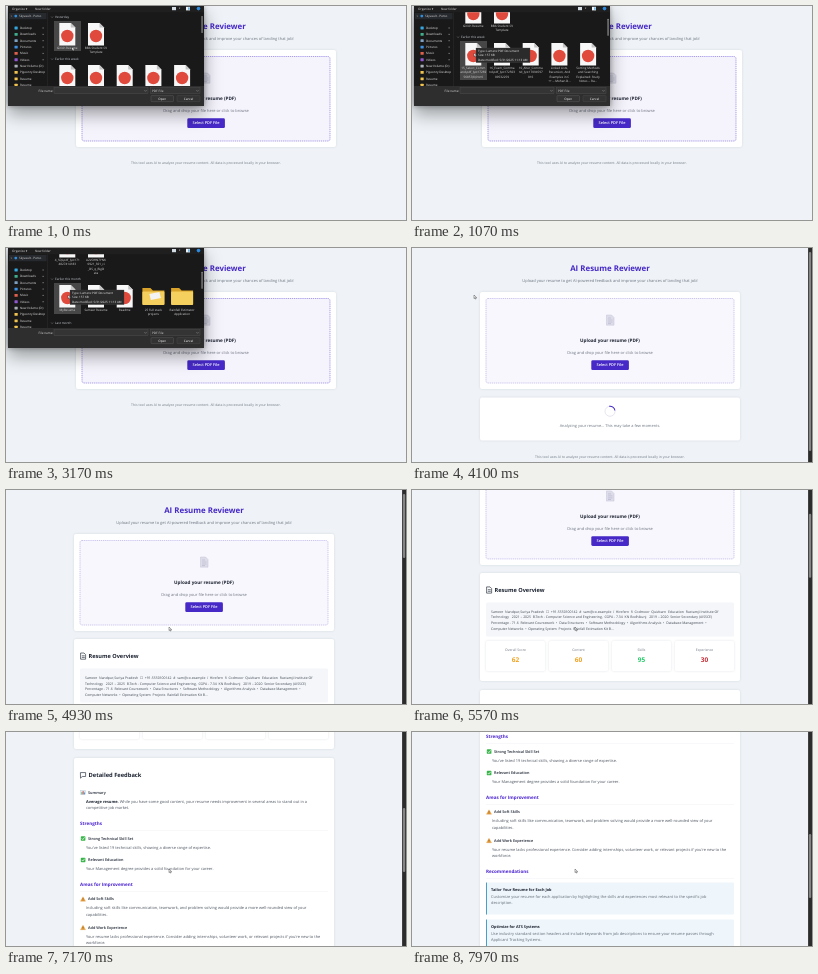
Recreate the animation shown at these times as an HTML page. Size 400x214 px, loop 8 s.

```html
<!DOCTYPE html>
<html lang="en">
<head>
<meta charset="utf-8">
<title>AI Resume Reviewer</title>
<style>
  html, body { margin: 0; width: 100%; height: 100%; overflow: hidden; background: #eff3f7; }
  svg { display: block; width: 100vw; height: 100vh; }
  text { font-family: "Open Sans", "Noto Sans", sans-serif; white-space: pre; text-rendering: geometricPrecision; }
  .card { fill: #fff; filter: drop-shadow(0 .8px 1.2px rgba(30, 40, 70, .13)); }
  .line { fill: none; stroke: #1f2937; stroke-width: .65; stroke-linejoin: round; stroke-linecap: round; }
  #dialog { filter: drop-shadow(0 .5px 2.7px rgba(0, 0, 0, .33)) drop-shadow(0 8.3px 8.3px rgba(0, 0, 0, .36)); }
</style>
</head>
<body>
<svg id="stage" viewBox="0 0 400 214" preserveAspectRatio="none"></svg>
<script>
const LOOP = 8000;
const DIALOG_END = 3520, ANALYZE_START = 3620, RESULTS_START = 4650;
const SCROLL_START = 4963, SCROLL_SPEED = 0.1087;
const INDIGO = '#4629c6', INK = '#1b2230', GREY = '#6c7480';

const rect = (x, y, w, h, fill, extra = '') =>
  `<rect x="${x}" y="${y}" width="${w}" height="${h}" fill="${fill}" ${extra}/>`;
const circle = (x, y, r, fill) => `<circle cx="${x}" cy="${y}" r="${r}" fill="${fill}"/>`;
const path = (d, extra) => `<path d="${d}" ${extra}/>`;
const card = (x, y, w, h, r = 2) => `<rect class="card" x="${x}" y="${y}" width="${w}" height="${h}" rx="${r}"/>`;
const group = (id, content, extra = '') => `<g id="${id}" ${extra}>${content}</g>`;

// y is the visual middle of the line
const text = (x, y, size, str, fill = GREY, weight = 400, anchor = 'start') =>
  `<text x="${x}" y="${(y + size * .32).toFixed(2)}" font-size="${size}" fill="${fill}" font-weight="${weight}" text-anchor="${anchor}">${str}</text>`;
const centered = (x, y, size, str, fill, weight) => text(x, y, size, str, fill, weight, 'middle');
const lines = (x, y, step, size, list, fill, anchor) =>
  list.map((str, i) => text(x, y + i * step, size, str, fill, 400, anchor)).join('');

// ---------- page ----------
function uploadCard() {
  return centered(198, 20.5, 7.9, 'AI Resume Reviewer', INDIGO, 700)
    + centered(198, 32.5, 3.98, 'Upload your resume to get AI-powered feedback and improve your chances of landing that job!')
    + card(68, 44, 260, 97)
    + `<rect id="drop" x="74" y="50.5" width="248" height="84.5" rx="2" stroke-width=".6" stroke-dasharray="1.3 .8"/>`
    + path('M194.5 67h5l2.5 2.5v7.7h-7.5z', 'fill="#dddde9" stroke="#b9b9cf" stroke-width=".4"')
    + path('M196 70h3M196 72h4.5M196 74h4.5M196 75.6h3', 'stroke="#a9a9c4" stroke-width=".5"')
    + centered(198, 93, 4.62, 'Upload your resume (PDF)', INK, 700)
    + centered(198, 105, 3.97, 'Drag and drop your file here or click to browse')
    + rect(179.3, 112.3, 37.6, 9.8, INDIGO, 'rx="1.4"')
    + centered(198, 117.2, 3.9, 'Select PDF File', '#fff', 600);
}

function analyzingCard() {
  return card(68, 149.5, 260, 43)
    + '<circle cx="198" cy="163.3" r="5" fill="none" stroke="#e6e6f2" stroke-width="1"/>'
    + `<path id="spinner" d="M194.46 159.76A5 5 0 0 1 201.54 159.76" fill="none" stroke="${INDIGO}" stroke-width="1"/>`
    + centered(198, 177.5, 3.91, 'Analyzing your resume... This may take a few moments.');
}

function overviewCard() {
  const scores = [['Overall Score', 62, '#f0a11e'], ['Content', 60, '#f0a11e'], ['Skills', 95, '#27c96a'], ['Experience', 30, '#c62f38']];
  return card(68, 149, 260, 108)
    + path('M75 163h3l1.6 1.6v4.6h-4.6zM76.2 165.8h2.2M76.2 167.4h2.2', 'class="line"')
    + text(82.5, 166.2, 5.6, 'Resume Overview', INK, 700)
    + rect(74, 178.5, 248, 34, '#f4f6f9', 'rx="1.5"')
    + lines(79, 187.6, 5.85, 3.45, [
      'Sameer  Nandpur,Suriya Pradesh  ☐  +91-5550100142  #  sam@co.example  ï  Hirefern  §  Codmoor  Quizbarn  Education  Rustamji Institute Of',
      'Technology   2021 – 2025  B.Tech - Computer Science and Engineering,  CGPA - 7.34  KN Bodhikunj   2019 – 2020  Senior Secondary (AISSCE)',
      'Percentage - 71.6  Relevant Coursework  •  Data Structures  •  Software Methodology  •  Algorithms Analysis  •  Database Management  •',
      'Computer Networks  •  Operating System  Projects  Rainfall Estimation Kit B...'], '#3f4753')
    + scores.map(([label, value, color], i) => {
      const x = 74 + i * 63;
      return card(x, 217, 59, 30, 1.5)
        + centered(x + 29.5, 225.8, 3.4, label)
        + centered(x + 29.5, 236, 6.5, value, color, 700);
    }).join('');
}

const icons = {
  chart: y => rect(74.8, y - 2, 4.6, 4.2, '#dfe8ee', 'stroke="#9db2c2" stroke-width=".3"')
    + rect(75.5, y - .4, .9, 2.2, '#3aa55d') + rect(76.7, y - 1.4, .9, 3.2, '#d8483e') + rect(77.9, y, .9, 1.8, '#3b82d6'),
  check: y => rect(74.8, y - 2.3, 4.6, 4.6, '#38b54a', 'rx=".7"')
    + path(`M75.8 ${y}l1 1.1 1.8-2.3`, 'fill="none" stroke="#fff" stroke-width=".7"'),
  warn: y => path(`M77 ${y - 2.2}l2.5 4.4h-5z`, 'fill="#f2a33a" stroke="#c98a3c" stroke-width=".3" stroke-linejoin="round"')
    + rect(76.75, y - .8, .5, 1.6, '#4a3410') + rect(76.75, y + 1.2, .5, .5, '#4a3410'),
};
const point = (icon, y, title, body) =>
  icons[icon](y) + text(82, y, 3.82, title, INK, 600) + lines(80, y + 9, 6.4, 3.93, body, '#4d5561');
const section = (y, title) =>
  text(74, y, 4.55, title, '#4a22cf', 700) + rect(74, y + 6.6, 248, .3, '#e6e8f0');
const advice = (y, title, body) =>
  rect(74, y, 248, 32, '#eff6fb', 'rx="1"') + rect(74, y, 1, 32, '#4a9fca')
  + text(79, y + 7.5, 3.85, title, INK, 700) + lines(79, y + 14, 6.4, 3.93, body, '#606a76');

function feedbackCard() {
  return card(68, 266, 260, 420)
    + path('M74.8 280.6h4.8v3.9h-3.3l-1.5 1.4z', 'class="line"')
    + text(82.5, 283, 5.75, 'Detailed Feedback', INK, 700)
    + point('chart', 300.5, 'Summary', [
      `<tspan font-weight="700" fill="${INK}">Average resume.</tspan> While you have some good content, your resume needs improvement in several areas to stand out in a`,
      'competitive job market.'])
    + section(332, 'Strengths')
    + point('check', 346.5, 'Strong Technical Skill Set', ["You've listed 19 technical skills, showing a diverse range of expertise."])
    + point('check', 368, 'Relevant Education', ['Your Management degree provides a solid foundation for your career.'])
    + section(393, 'Areas for Improvement')
    + point('warn', 407, 'Add Soft Skills', [
      'Including soft skills like communication, teamwork, and problem solving would provide a more well-rounded view of your',
      'capabilities.'])
    + point('warn', 435.5, 'Add Work Experience', [
      "Your resume lacks professional experience. Consider adding internships, volunteer work, or relevant projects if you're new to the",
      'workforce.'])
    + section(467, 'Recommendations')
    + advice(477.5, 'Tailor Your Resume for Each Job', [
      'Customize your resume for each application by highlighting the skills and experiences most relevant to the specific job',
      'description.'])
    + advice(514.5, 'Optimize for ATS Systems', [
      'Use industry standard section headers and include keywords from job descriptions to ensure your resume passes through',
      'Applicant Tracking Systems.']);
}

// ---------- file dialog ----------
const LIGHT = '#dcdcdc';
const columnX = i => 61.3 + i * 28.7;
const header = (y, label) =>
  path(`M45.2 ${y - .4}l.9 .9 .9-.9`, 'fill="none" stroke="#bbb" stroke-width=".4"') + text(49, y, 3.1, label, '#c6cdd6');

function pdfIcon(x, y) {
  return path(`M${x - 8} ${y}h11.5l4.5 4.5v18h-16z`, 'fill="#f7f7f7"')
    + path(`M${x + 3.5} ${y}v4.5h4.5z`, 'fill="#c4c4c4"')
    + circle(x, y + 13, 6.2, '#df4a3d');
}
function folderIcon(x, y, hasPaper) {
  return path(`M${x - 11} ${y + 3}h8l2.5 2.5h11.5v14h-22z`, 'fill="#d9a429"')
    + rect(x - 11, y + 6.5, 22, 13.5, '#f6d05e', 'rx="1"')
    + (hasPaper ? path(`M${x - 4} ${y + 9}l10-2 1.5 6-10 2z`, 'fill="#f3f3f3"') : '');
}
const fileRow = (top, names, folderFrom = 9) => names.map((name, i) =>
  (i < folderFrom ? pdfIcon(columnX(i), top) : folderIcon(columnX(i), top, i === folderFrom))
  + lines(columnX(i), top + 25, 4.5, 3.05, name.split('|'), LIGHT, 'middle')).join('');

function fileList() {
  return header(11, 'Yesterday')
    + fileRow(17, ['Girish Resume', 'BBA Student CV|Template'])
    + header(53, 'Earlier this week')
    + fileRow(59, ['15_Select_Comm|and.pdf_lyst17269|56857(8).html', '16_Exam_Comma|nd.pdf_lyst172503|09532259', '10_Alter_Comma|nd_lyst17094597|016',
      'Linked Lists,|Recursion, And|Examples in C|++ -- Mohan D...', 'Sorting Methods|and Searching|Explained: Study|Notes -- Ra...'])
    + fileRow(102, ['4_SQLpdf_lyst171|4827414183', 'A2VOHN7YNK|0921_S01_ci|_DS_q_BigD|ata'])
    + header(146, 'Earlier this month')
    + fileRow(152, ['MyResume', 'Sameer Resume', 'Readme', '25 Full stack|projects', 'Rainfall Estimator|Application'], 3)
    + header(190, 'Last month');
}

function sidebar() {
  const places = [['Desktop', '#35a7e0'], ['Downloads', '#3fae8c'], ['Documents', '#7d9fc0'], ['Pictures', '#3d8fe0'], ['Music', '#e0604c'],
    ['Videos', '#9058d0'], ['New Volume (D:)', '#a9b0b8'], ['Pigeonry Desktop', '#f0c24e'], ['Resume', '#f0c24e'], ['Resume', '#f0c24e']];
  return rect(3, 7, 37.5, 6.2, '#26292d')
    + path('M5 9.3l.8 .8-.8 .8', 'fill="none" stroke="#bbb" stroke-width=".4"')
    + circle(9.8, 10.1, 1.4, '#2f8ee0') + text(13, 10.1, 3.05, 'Skyvault - Perso', LIGHT)
    + places.map(([name, color], i) => {
      const y = 22 + i * 6.35;
      return rect(8.5, y - 1.4, 3.2, 2.8, color, 'rx=".4"') + text(14, y, 3.05, name, '#e8e8e8')
        + (i < 6 ? rect(36.6, y - .5, 1, 1, '#a0a0a0') : '');
    }).join('');
}

function dialog() {
  return rect(2, 0, 196, 100, '#1f1f1f')
    + rect(2, 6.3, 196, 73.7, '#191919')
    + text(6, 2.8, 3.1, 'Organize ▾', LIGHT) + text(29, 2.8, 3.1, 'New folder', LIGHT)
    + rect(166, 1, 4, 3.2, '#d5dde4') + text(173, 2.6, 2.6, '▾', LIGHT)
    + rect(180, .8, 4, 3.6, '#f0f4f8') + rect(182.2, 1.4, 1.4, 2.4, '#4da3e0') + circle(192.5, 2.6, 1.8, '#2b8ae0')
    + `<g clip-path="url(#listClip)">${sidebar()}<rect id="hover" x="48" width="27" fill="#474747"/>${group('files', fileList())}</g>`
    + rect(41.3, 6.3, .4, 73.7, '#333')
    + '<rect id="listThumb" x="195.5" width="1.1" height="17" rx=".5" fill="#9a9a9a"/>'
    + rect(2, 80, 196, 20, '#2e2e2e')
    + text(32.5, 84.7, 3.1, 'File name:', LIGHT)
    + rect(48, 81.7, 94, 6, '#343434', 'stroke="#5c5c5c" stroke-width=".3"')
    + rect(144.5, 81.7, 49.5, 6, '#343434', 'stroke="#5c5c5c" stroke-width=".3"') + text(146, 84.7, 3.1, 'PDF File', LIGHT)
    + [139.5, 191.5].map(x => path(`M${x - 1} 84.3l1 1 1-1`, 'fill="none" stroke="#ccc" stroke-width=".4"')).join('')
    + rect(145, 89.6, 22.5, 6, '#333', 'rx=".7" stroke="#777" stroke-width=".3"') + centered(156.2, 92.6, 3.1, 'Open', '#fff')
    + rect(171, 89.6, 23, 6, '#333', 'rx=".7" stroke="#5c5c5c" stroke-width=".3"') + centered(182.5, 92.6, 3.1, 'Cancel', '#fff')
    + group('tooltip', rect(64, 42, 54, 14.6, '#2b2b2b', 'stroke="#444" stroke-width=".3"')
      + lines(66, 45, 4.5, 3, ['Type: Lumenz PDF Document', 'Size: 157 KB', 'Date modified: 5/31/2025 11:13 AM'], '#f0f0f0'));
}

document.getElementById('stage').innerHTML =
  '<clipPath id="listClip"><rect x="2" y="6.3" width="196" height="73.7"/></clipPath>'
  + rect(0, 0, 400, 214, '#eff3f7')
  + group('page', uploadCard() + group('analyzing', analyzingCard()) + group('results', overviewCard() + feedbackCard())
    + group('footer', centered(198, 0, 3.44, 'This tool uses AI to analyze your resume content. All data is processed locally in your browser.', '#6f7783')))
  + group('scrollbar', rect(396.1, 0, 3.9, 214, '#2c2c2c') + '<rect id="thumb" x="396.9" width="2.3" rx="1.1" fill="#858585"/>')
  + group('dialog', dialog())
  + group('cursor', path('M0 0v3.6l.9-.8.6 1.3.6-.3-.6-1.2h1.2z', 'fill="#fff" stroke="#222" stroke-width=".4"'));

// ---------- motion ----------
const el = Object.fromEntries([...document.querySelectorAll('[id]')].map(e => [e.id, e]));
const set = (id, attrs) => { for (const k in attrs) el[id].setAttribute(k, attrs[k]); };
const show = (id, on) => set(id, { display: on ? 'inline' : 'none' });
const move = (id, x, y) => set(id, { transform: `translate(${x} ${y})` });

// time, list offset, hovered item top and height
const listSteps = [[0, 0, 15, 30], [450, 22, 35, 39], [1800, 53, 47, 39], [2080, 84, 16, 39], [2400, 115, 35, 31]];
const cursorKeys = [[0, 66, 41], [250, 66, 41], [500, 62, 47], [4250, 62, 47], [4800, 163, 137]];

function cursorAt(t) {
  const i = cursorKeys.findLastIndex(k => k[0] <= t);
  const a = cursorKeys[i], b = cursorKeys[i + 1];
  if (!b) return a.slice(1);
  const u = (t - a[0]) / (b[0] - a[0]), e = u * u * (3 - 2 * u);
  return [1, 2].map(k => a[k] + (b[k] - a[k]) * e);
}

function draw(t) {
  const analyzed = t >= ANALYZE_START, done = t >= RESULTS_START;
  const scroll = Math.max(0, t - SCROLL_START) * SCROLL_SPEED;

  move('page', analyzed ? 0 : 2, -scroll);
  show('analyzing', analyzed && !done);
  show('results', done);
  show('scrollbar', analyzed);
  move('footer', 0, done ? 696 : analyzed ? 208.5 : 156.8);
  set('drop', analyzed ? { fill: '#f8f7fd', stroke: '#ada3e6' } : { fill: '#f5f3fc', stroke: '#7663dd' });
  set('spinner', { transform: `rotate(${(t - 4100) * .36 + 35} 198 163.3)` });
  set('thumb', { y: 4 + scroll * .3, height: done ? 64 : 199 });

  const [, offset, hoverY, hoverH] = listSteps.findLast(s => s[0] <= t);
  show('dialog', t < DIALOG_END);
  move('files', 0, -offset);
  set('hover', { y: hoverY, height: hoverH });
  set('listThumb', { y: 10 + offset * .12 });
  show('tooltip', (t > 900 && t < 1800) || t > 2850);
  move('cursor', ...cursorAt(t));
}

const start = performance.now();
function tick() {
  draw((performance.now() - start) % LOOP);
  requestAnimationFrame(tick);
}
tick();
</script>
</body>
</html>
```
